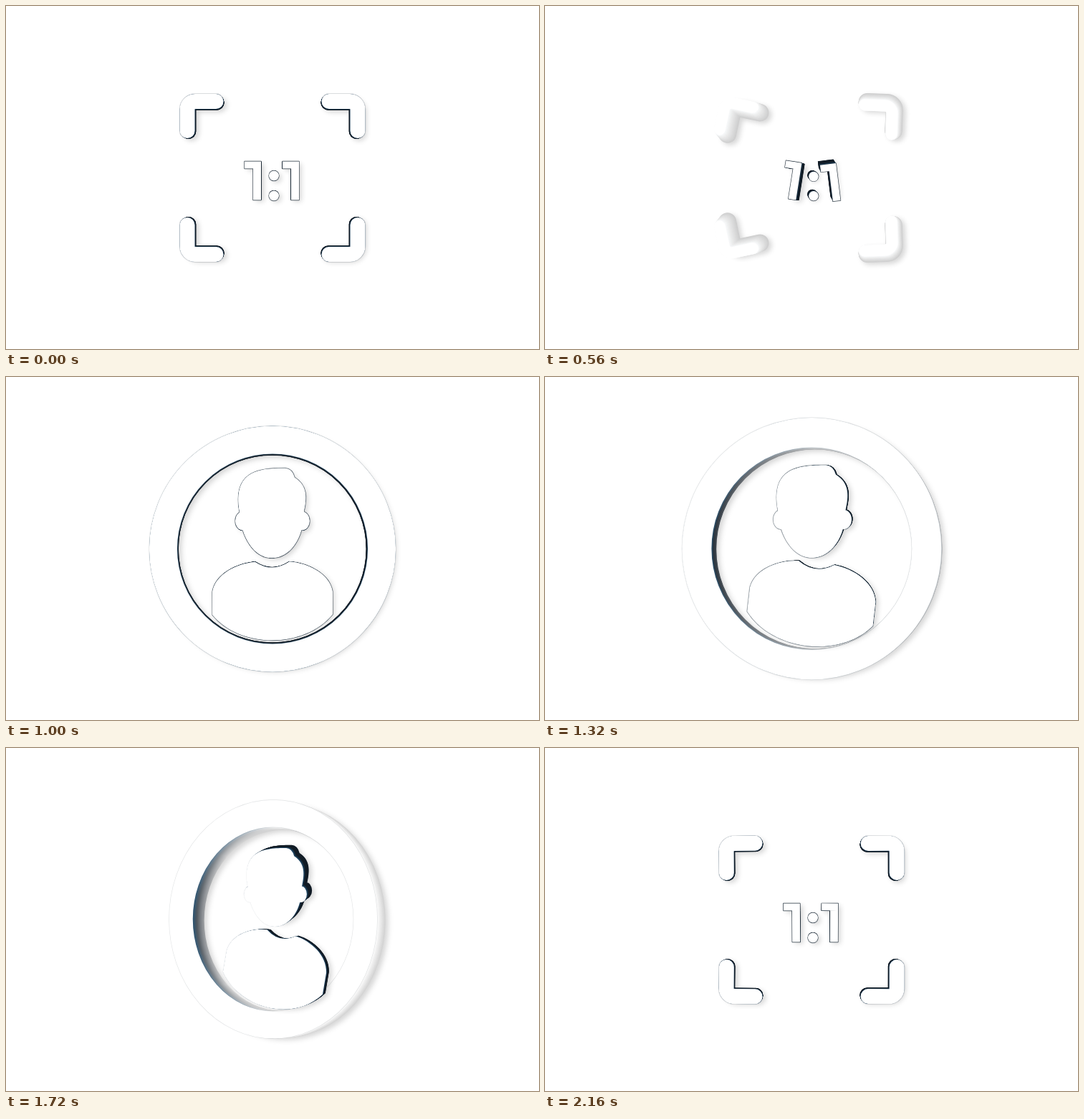
An HTML page with a canvas for the animation above (2200 ms loop, 744 px wide and 480 px high).

```html
<!DOCTYPE html>
<html lang="en">
<head>
<meta charset="utf-8">
<title>Aspect ratio and profile</title>
<style>
html, body { margin: 0; width: 100%; height: 100%; overflow: hidden; background: #fff; }
canvas { display: block; }
</style>
</head>
<body>
<canvas id="stage" width="744" height="480"></canvas>
<script>
const ctx = document.getElementById('stage').getContext('2d');
const LOOP = 2200, STEP = 40, LAYERS = 16;
const clamp = v => Math.max(0, Math.min(1, v));
const mix = (a, b, k) => a + (b - a) * k;

const circle = r => () => ctx.arc(0, 0, r, 0, 7);

// L bracket with its legs pointing along sx and sy
const bracket = (sx, sy) => () => {
  ctx.moveTo(sx * 40, 0);
  ctx.arcTo(0, 0, 0, sy * 41, 11);
  ctx.lineTo(0, sy * 41);
};

function one() {
  ctx.rect(-12, -27, 23, 10);
  ctx.rect(0, -27, 11, 54);
}

function head() {
  ctx.moveTo(-46, -2);
  ctx.bezierCurveTo(-56, -60, -18, -63, 18, -63);
  ctx.quadraticCurveTo(28, -62, 31, -50);
  ctx.bezierCurveTo(50, -38, 48, -20, 44, -2);
  ctx.bezierCurveTo(44, 35, 25, 63, -1, 63);
  ctx.bezierCurveTo(-25, 63, -44, 35, -46, -2);
  for (const x of [-42, 42]) {
    ctx.moveTo(x + 10, 11);
    ctx.ellipse(x, 11, 10, 13, 0, 0, 7);
  }
}

function body() {
  ctx.moveTo(-84, 32);
  ctx.lineTo(-84, 0);
  ctx.bezierCurveTo(-80, -25, -50, -40, -24, -42);
  ctx.quadraticCurveTo(0, -26, 24, -42);
  ctx.bezierCurveTo(50, -40, 80, -25, 84, 0);
  ctx.lineTo(84, 32);
  ctx.bezierCurveTo(45, 80, -45, 80, -84, 32);
}

// ext is how far the back of a piece slides at a full turn
const corner = (sx, sy) => ({
  x: sx * 119, y: sy * 107, path: bracket(-sx, -sy), w: 21, soft: true, edge: .2,
  rot: -sy * (7 - 5 * sx), ext: [7 - 2 * sx, 6 * sx * sy]
});
const digit = (x, rot, ext) => ({ x, y: 4, path: one, rot, ext, edge: .85 });
const dot = y => ({ x: 2, y, path: circle(7), rot: 0, ext: [-2, -2], edge: .8 });

const frame = {
  mid: 0, span: 560, shift: 0, squeeze: 0,
  pieces: [
    corner(-1, -1), corner(1, -1), corner(-1, 1), corner(1, 1),
    digit(-27, 9, [4, 1]), digit(26, -7, [-3, -6]), dot(-3), dot(25)
  ]
};
const profile = {
  mid: 1040, span: 680, shift: 8, squeeze: .13,
  pieces: [
    { x: 0, y: 0, path: circle(152.5), w: 39, rot: 0, ext: [14, 2], edge: .13, ring: true },
    { x: 0, y: 60, path: body, rot: 11, ext: [5, 0], edge: .6, fade: .9 },
    { x: 0, y: -50, path: head, rot: 0, ext: [8, -6], edge: .6, fade: .9, shrink: .1 }
  ]
};

// Side wall colour: blue-black near the face, or a pale grey when soft
function wall(depth, soft) {
  const dark = clamp(depth * 2.5), light = 255 - 45 * depth;
  const rgb = [[36, 18], [84, 28], [120, 38]].map(([a, b]) => Math.round(mix(mix(a, b, dark), light, soft)));
  return `rgb(${rgb})`;
}

// The ring is dark on the side it turns away from and pale on the other
function ringWall(depth, turn) {
  const edge = turn < 0 ? -135 : 135, g = ctx.createLinearGradient(-edge, 0, edge, 0);
  const soft = clamp(Math.abs(turn) * 2.6), haze = depth * Math.abs(turn) * .7;
  g.addColorStop(0, wall(depth, clamp(haze)));
  g.addColorStop(.15, wall(depth, clamp(haze + soft * .3)));
  g.addColorStop(.5, wall(depth, soft));
  return g;
}

function paint(p, color, grow = 0) {
  ctx.beginPath();
  p.path();
  ctx.fillStyle = ctx.strokeStyle = color;
  ctx.lineWidth = (p.w || 0) + grow;
  if (!p.w) ctx.fill();
  if (p.w || grow) ctx.stroke();
}

function drawPiece(p, turn, scale, scene) {
  const size = Math.abs(turn), swing = Math.sign(turn) * clamp(size * 1.9);
  const soft = p.soft ? clamp((size - .35) * 1.5) : 0;
  const squeeze = 1 - scene.squeeze * turn * turn;
  for (let i = LAYERS; i >= 0; i--) {
    const depth = i / LAYERS, back = scale * (1 - depth * .017);
    const slide = turn * (depth - .5);
    ctx.save();
    ctx.translate(372 + scene.shift * turn + p.ext[0] * slide, 240.5 + p.ext[1] * slide);
    ctx.scale(back * squeeze, back);
    ctx.translate(p.x, p.y);
    ctx.rotate(p.rot * swing * Math.PI / 180);
    ctx.scale(1, 1 - (p.shrink || 0) * size);
    if (i === LAYERS) {
      ctx.shadowColor = 'rgba(0,0,0,.16)';
      ctx.shadowBlur = 7;
      ctx.shadowOffsetX = 4;
      ctx.shadowOffsetY = 3;
    }
    const bevel = (depth - .5) * 9 * soft;
    if (i) {
      paint(p, p.ring ? ringWall(depth, turn) : wall(depth, soft), bevel);
    } else {
      const edge = p.edge * (1 - (p.fade || 0) * clamp(size)) * (1 - soft);
      paint(p, `rgba(25,38,50,${edge})`, 1.4 + bevel);
      paint(p, '#fff', bevel);
    }
    ctx.restore();
  }
}

function render(now) {
  const t = Math.floor(now % LOOP / STEP) * STEP;
  const scene = t >= 640 && t < 1760 ? profile : frame;
  const fromMid = (t - scene.mid + LOOP / 2) % LOOP - LOOP / 2;
  // Pieces arrive from a smaller turn than the one they leave with
  const x = fromMid / scene.span * (fromMid < 0 ? .7 : 1);
  const turn = Math.sign(x) * Math.abs(x) ** 1.3;
  const scale = 1 + .4 * x ** 2 - .43 * x ** 6;
  ctx.fillStyle = '#fff';
  ctx.fillRect(0, 0, 744, 480);
  ctx.lineCap = ctx.lineJoin = 'round';
  for (const p of scene.pieces) drawPiece(p, turn, scale, scene);
}

const start = performance.now();
function tick() {
  render(performance.now() - start);
  requestAnimationFrame(tick);
}
tick();
</script>
</body>
</html>
```
